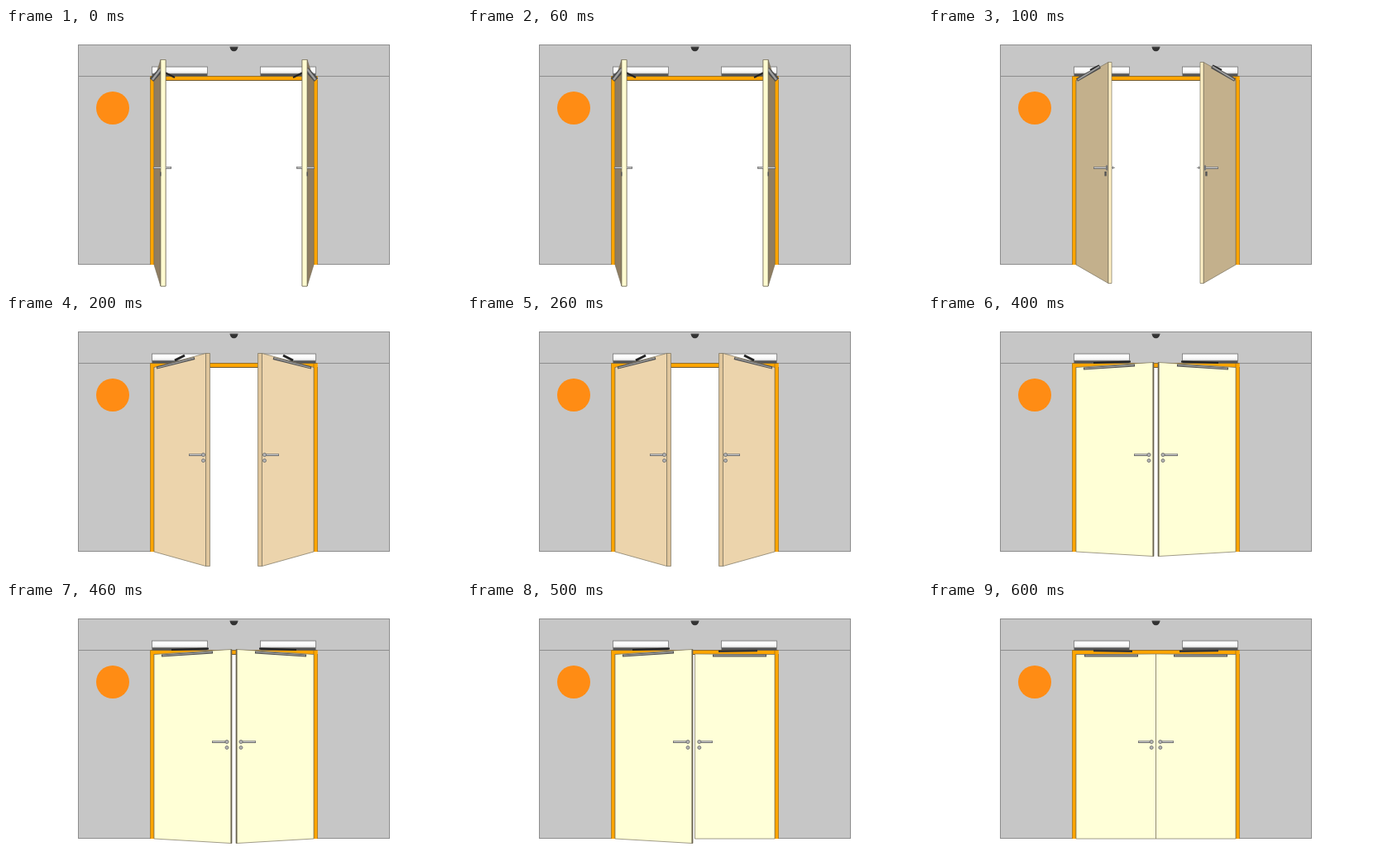
An HTML page with a canvas for the animation above (0.7 s loop, 550 px wide and 314 px high).

```html
<!DOCTYPE html>
<html lang="en">
<head>
<meta charset="utf-8">
<title>Double swing door</title>
<style>
html, body { margin: 0; width: 100%; height: 100%; overflow: hidden; background: #fff; }
canvas { display: block; }
</style>
</head>
<body>
<canvas id="stage" width="550" height="314"></canvas>
<script>
const ctx = document.getElementById('stage').getContext('2d');
const AXIS = 275.5, HINGE = 179, STEP = 100;

// Left-leaf poses, from wide open to closed:
// x, w = free edge; top, bottom = its height span; bar, arm = [x1, y1, x2, y2, width]
const poses = [
  { x: 187, w: 6, top: 38.5, bottom: 313, face: '#8f7d62', edge: '#fffbd0',
    bar: [176, 63, 188, 50, 6], arm: [192, 54, 204, 60, 2], lever: [178, 187], key: 186.5 },
  { x: 218, w: 4, top: 41.5, bottom: 309.5, face: '#c3b08c', edge: '#fff0c4',
    bar: [180, 63, 208, 47, 4], arm: [196, 51, 207, 45.5, 2], lever: [200, 216], key: 214.5 },
  { x: 241.5, w: 5, top: 46.5, bottom: 304.5, face: '#ecd4ac', edge: '#dfc59b',
    bar: [182, 64, 228, 52.5, 3], arm: [204, 55, 216, 49, 3], lever: [221, 238.5], key: 238.5 },
  { x: 261, w: 2.5, top: 52, bottom: 298.5, face: '#fff0c4', edge: '#d5bf94',
    bar: [186, 65, 242, 56.5, 2.5], arm: [200, 59, 233, 51.5, 2], lever: [238, 256.3], key: 256.3 },
  { x: 272, w: 1, top: 57.5, bottom: 292.5, face: '#ffffd6', edge: '#55503c',
    bar: [188, 65, 250, 61, 3], arm: [200, 58, 245, 56.5, 2], lever: [249, 267], key: 267 },
  { x: 275.5, w: 0, top: 63, bottom: 287, face: '#ffffd8', edge: '#ffffd8',
    bar: [189, 65, 254, 65, 3], arm: [200, 59, 247, 59.7, 2.5], lever: [254, 270], key: 270.2 }
];
const steps = [[0, 0], [1, 1], [2, 2], [3, 3], [4, 4], [4, 5], [5, 5]];

function rect(x, y, w, h, fill) {
  ctx.fillStyle = fill;
  ctx.fillRect(x, y, w, h);
}

function line(x1, y1, x2, y2, color, width = 1) {
  ctx.strokeStyle = color;
  ctx.lineWidth = width;
  ctx.beginPath();
  ctx.moveTo(x1, y1);
  ctx.lineTo(x2, y2);
  ctx.stroke();
}

function poly(points, fill, stroke) {
  ctx.beginPath();
  points.forEach(([x, y]) => ctx.lineTo(x, y));
  ctx.closePath();
  ctx.fillStyle = fill;
  ctx.fill();
  if (!stroke) return;
  ctx.strokeStyle = stroke;
  ctx.lineWidth = 0.7;
  ctx.stroke();
}

function disc(x, y, r, fill, stroke) {
  ctx.beginPath();
  ctx.arc(x, y, r, 0, 7);
  ctx.fillStyle = fill;
  ctx.fill();
  if (!stroke) return;
  ctx.strokeStyle = stroke;
  ctx.lineWidth = 0.8;
  ctx.stroke();
}

function drawWall() {
  rect(0, 0, 550, 314, '#fff');
  rect(87, 20, 377, 267, '#c6c6c6');
  line(87, 58.5, 464, 58.5, '#8d8d8d');
  ctx.strokeStyle = '#8d8d8d';
  ctx.strokeRect(87.5, 20.5, 376, 266);
  disc(129, 97, 20, '#ff8c14');

  ctx.beginPath();
  ctx.ellipse(AXIS, 23, 4.8, 5.2, 0, 0, Math.PI);
  ctx.fillStyle = '#333';
  ctx.fill();
  line(270.5, 23, 280.5, 23, '#555');

  rect(HINGE, 63, 193, 225, '#fff');
  rect(174.5, 58.5, 202, 5, '#ffa500');
  for (const x of [174.5, 372]) {
    rect(x, 58.5, 4.5, 228.5, '#ffa500');
    line(x, 59, x, 287, '#9a6c18', 0.7);
    line(x + 4.5, 63, x + 4.5, 287, '#9a6c18', 0.7);
  }
  line(174.5, 58.5, 376.5, 58.5, '#86642a', 0.8);
  line(HINGE, 63.5, 372, 63.5, '#4a3510', 0.8);
}

function drawOperator() {
  const shine = ctx.createLinearGradient(0, 46, 0, 56);
  shine.addColorStop(0, '#d5d5d5');
  shine.addColorStop(0.3, '#fff');
  shine.addColorStop(0.7, '#f8f8f8');
  shine.addColorStop(1, '#c4c4c4');
  rect(176.5, 55, 67, 3.5, '#555');
  rect(176.5, 47, 67, 8.5, shine);
  ctx.strokeStyle = '#777';
  ctx.lineWidth = 0.8;
  ctx.strokeRect(176.5, 47, 67, 8.5);
}

function drawBar([x1, y1, x2, y2, width]) {
  line(x1, y1, x2, y2, '#4c4c4c', width);
  line(x1 + 1, y1 - 0.2, x2 - 1, y2 - 0.2, '#a0a0a0', width * 0.4);
}

function drawHandle({ lever: [from, to], key }, pose) {
  line(from, 169.6, to, 169.6, '#666', 2.8);
  line(from + 0.7, 169.4, to, 169.4, '#ccc', 1.3);
  if (pose === 0) {
    line(193, 169.4, 200, 169.4, '#666', 2.8);
    line(193, 169.2, 199.3, 169.2, '#ccc', 1.3);
    rect(186, 174.5, 1.5, 5, '#555');
  } else if (pose === 1) {
    rect(215, 166.5, 2.2, 6, '#777');
    rect(213.4, 174, 2.4, 5.5, '#555');
    line(222, 169.3, 226, 169.3, '#888', 1);
    line(223.5, 167.7, 223.5, 171, '#777', 1);
  } else {
    disc(key, 169.5, 2.1, '#b5b5b5', '#666');
    disc(key, 176.5, 2, '#b5b5b5', '#666');
  }
}

function drawLeaf(pose) {
  const p = poses[pose], { x, w, top, bottom } = p;
  drawOperator();
  if (pose === 5) line(...p.arm.slice(0, 4), '#333', p.arm[4]);
  poly([[HINGE, 63.5], [x, top], [x, bottom], [HINGE, 287]], p.face, '#77705c');
  if (w) poly([[x, top], [x + w, top], [x + w, bottom], [x, bottom]], p.edge, '#77705c');
  if (pose < 5) line(...p.arm.slice(0, 4), '#222', p.arm[4]);
  drawBar(p.bar);
  if (pose === 0) poly([[x, top], [x + w, top], [x + w, bottom], [x, bottom]], p.edge, '#77705c');
  drawHandle(p, pose);
}

function mirrored(draw) {
  ctx.save();
  ctx.translate(2 * AXIS, 0);
  ctx.scale(-1, 1);
  draw();
  ctx.restore();
}

function frame(now) {
  const [left, right] = steps[Math.floor(now / STEP) % steps.length];
  drawWall();
  mirrored(() => drawLeaf(right));
  drawLeaf(left);
  requestAnimationFrame(frame);
}

frame(0);
</script>
</body>
</html>
```
